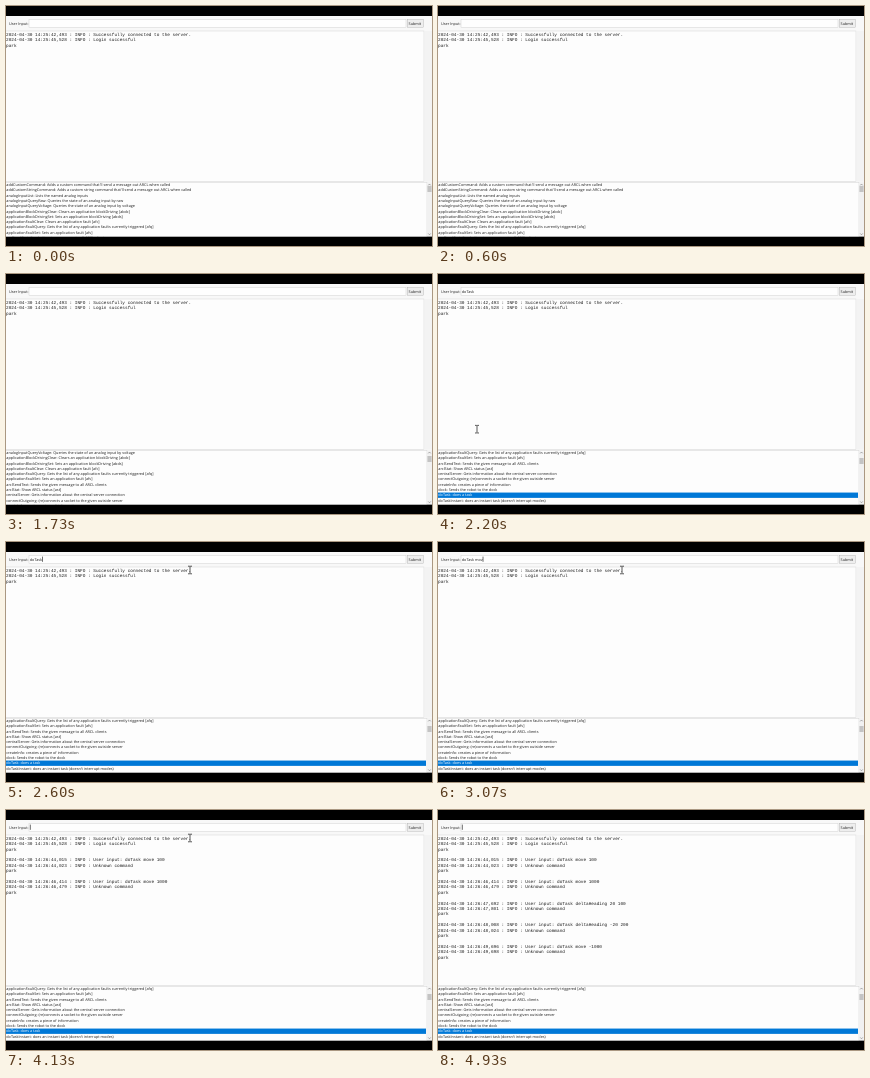
An HTML page that plays this animation: 426x240 px, repeating every 4.99 s.

```html
<!DOCTYPE html>
<html lang="en">
<head>
<meta charset="utf-8">
<title>Command console</title>
<style>
  html, body { margin: 0; width: 100%; height: 100%; overflow: hidden; background: #000; }
  svg { display: block; width: 100%; height: 100%; }
  text { white-space: pre; text-rendering: geometricPrecision; fill: #1c1c1c; }
  .ui { font: 3.77px "Open Sans", "Noto Sans", sans-serif; }
  .log { font: 4.43px "Liberation Mono", "DejaVu Sans Mono", monospace; }
  .edge { fill: none; stroke: #c9c9c9; stroke-width: .4; }
</style>
</head>
<body>
<svg viewBox="0 0 426 240" preserveAspectRatio="none">
  <defs><clipPath id="pane"><rect y="177" width="420" height="53.6"/></clipPath></defs>
  <rect width="426" height="240"/>
  <rect y="10" width="426" height="220.7" fill="#f8f8f8"/>

  <rect class="edge" x="23" y="13.4" width="377" height="7.8" style="fill:#fefefe"/>
  <rect class="edge" x="401.2" y="13.4" width="16" height="7.8" style="fill:#eee;stroke:#aaa"/>
  <text class="ui" x="3" y="18.8">User Input:</text>
  <text class="ui" x="402.6" y="18.8">Submit</text>
  <text class="ui" id="entry" x="23.8" y="18.8"></text>
  <rect id="caret" y="14.6" width=".6" height="5.2" fill="#111"/>

  <rect class="edge" x="-1" y="25" width="419" height="150.6" style="fill:#fdfdfd"/>
  <rect x="418.4" y="25" width="7.6" height="150.6" fill="#f3f3f3"/>
  <g id="log"></g>

  <rect class="edge" x="-1" y="176.4" width="422" height="56" style="fill:#fdfdfd"/>
  <g clip-path="url(#pane)"><g id="list"></g></g>
  <rect x="421" y="176.4" width="5" height="54.3" fill="#f1f1f1"/>
  <path d="M422.2 179.4l1.3-1.4 1.3 1.4M422.2 227.4l1.3 1.4 1.3-1.4" fill="none" stroke="#666" stroke-width=".5"/>
  <rect id="thumb" x="421.4" width="4.2" height="6" fill="#c4c4c4"/>
  <rect y="230.7" width="426" height="9.3"/>

  <path id="beam" d="M-2-3.8h1.4l.6.5.6-.5h1.4M0-3.3v6.6M-2 3.8h1.4l.6-.5.6.5h1.4" fill="none" stroke="#111" stroke-width=".7"/>
</svg>
<script>
const LOOP = 4990, STEP = LOOP / 75;
const LOG_PITCH = 5.4, ROW = 5.32, PICK = 16;
const $ = id => document.getElementById(id);

const commands = [
  "addCustomCommand: Adds a custom command that'll send a message out ARCL when called",
  "addCustomStringCommand: Adds a custom string command that'll send a message out ARCL when called",
  "analogInputList: Lists the named analog inputs",
  "analogInputQueryRaw: Queries the state of an analog input by raw",
  "analogInputQueryVoltage: Queries the state of an analog input by voltage",
  "applicationBlockDrivingClear: Clears an application blockDriving [abdc]",
  "applicationBlockDrivingSet: Sets an application blockDriving [abds]",
  "applicationFaultClear: Clears an application fault [afc]",
  "applicationFaultQuery: Gets the list of any application faults currently triggered [afq]",
  "applicationFaultSet: Sets an application fault [afs]",
  "arclSendText: Sends the given message to all ARCL clients",
  "arclStat: Show ARCL status [ast]",
  "centralServer: Gets information about the central server connection",
  "connectOutgoing: (re)connects a socket to the given outside server",
  "createInfo: creates a piece of information",
  "dock: Sends the robot to the dock",
  "doTask: does a task",
  "doTaskInstant: does an instant task (doesn't interrupt modes)"
];

// typing start, submit time, characters already present, text, two log times
const inputs = [
  [2730, 3600, 6, "doTask move 100", "44,015", "44,023"],
  [3660, 4060, 0, "doTask move 1000", "46,414", "46,479"],
  [4130, 4400, 0, "doTask deltaHeading 20 100", "47,692", "47,801"],
  [4400, 4660, 0, "doTask deltaHeading -20 200", "48,008", "48,024"],
  [4660, 4860, 0, "doTask move -1000", "49,696", "49,698"]
];
const SELECT = 2060, FOCUS = 2520;
const scrolls = [[1660, 4], [1800, 8]];
const pointer = [[2130, 39, 170], [2200, 39, 155], [2470, 184, 28], [4500, 184, 28]];

function make(tag, parent, attrs, content = "") {
  const el = document.createElementNS("http://www.w3.org/2000/svg", tag);
  for (const key in attrs) el.setAttribute(key, attrs[key]);
  el.textContent = content;
  return parent.appendChild(el);
}

const line = (time, message) => `2024-04-30 14:${time} : INFO : ${message}`;
let logRow = 0;
function addBlock(lines) {
  const block = make("g", $("log"), {});
  for (const s of lines) {
    make("text", block, { class: "log", x: 0, y: 29.7 + LOG_PITCH * logRow++ }, s);
  }
  logRow++;
  return block;
}

addBlock([
  line("25:42,493", "Successfully connected to the server."),
  line("25:45,528", "Login successful"),
  "park"
]);
const blocks = inputs.map(([, , , text, sent, reply]) => addBlock([
  line("26:" + sent, "User input: " + text),
  line("26:" + reply, "Unknown command"),
  "park"
]));

const bar = make("rect", $("list"), { y: 176 + PICK * ROW, width: 420, height: ROW, fill: "#0078d7" });
const rows = commands.map((s, i) =>
  make("text", $("list"), { class: "ui", x: .3, y: 179.9 + i * ROW }, s));

function entryText(t) {
  if (t < SELECT) return "";
  if (t < inputs[0][0]) return "doTask";
  const now = inputs.find(([start, end]) => t >= start && t < end);
  if (!now) return "";
  const [start, end, kept, text] = now;
  const done = Math.min(1, (t - start) / ((end - start) * .88));
  return text.slice(0, kept + Math.round((text.length - kept) * done));
}

function pointerAt(t) {
  const i = pointer.findIndex(p => p[0] > t);
  if (i < 1) return null;
  const [t0, x0, y0] = pointer[i - 1], [t1, x1, y1] = pointer[i];
  const u = (t - t0) / (t1 - t0), k = u * u * (3 - 2 * u);
  return [x0 + (x1 - x0) * k, y0 + (y1 - y0) * k];
}

const show = (el, on) => el.setAttribute("visibility", on ? "visible" : "hidden");

function draw(t) {
  const top = scrolls.reduce((n, [at, row]) => t >= at ? row : n, 0);
  $("list").setAttribute("transform", `translate(0 ${-top * ROW})`);
  $("thumb").setAttribute("y", 180 + top * .5);

  const picked = t >= SELECT;
  show(bar, picked);
  rows[PICK].style.fill = picked ? "#fff" : "";

  const entry = $("entry");
  entry.textContent = entryText(t);
  $("caret").setAttribute("x", 23.9 + entry.getComputedTextLength());
  show($("caret"), t >= FOCUS);
  blocks.forEach((block, i) => show(block, t >= inputs[i][1]));

  const pos = pointerAt(t);
  show($("beam"), pos);
  if (pos) $("beam").setAttribute("transform", `translate(${pos})`);
}

function tick() {
  const t = performance.now() % LOOP;
  draw(Math.floor(t / STEP) * STEP);
  requestAnimationFrame(tick);
}
tick();
</script>
</body>
</html>
```
